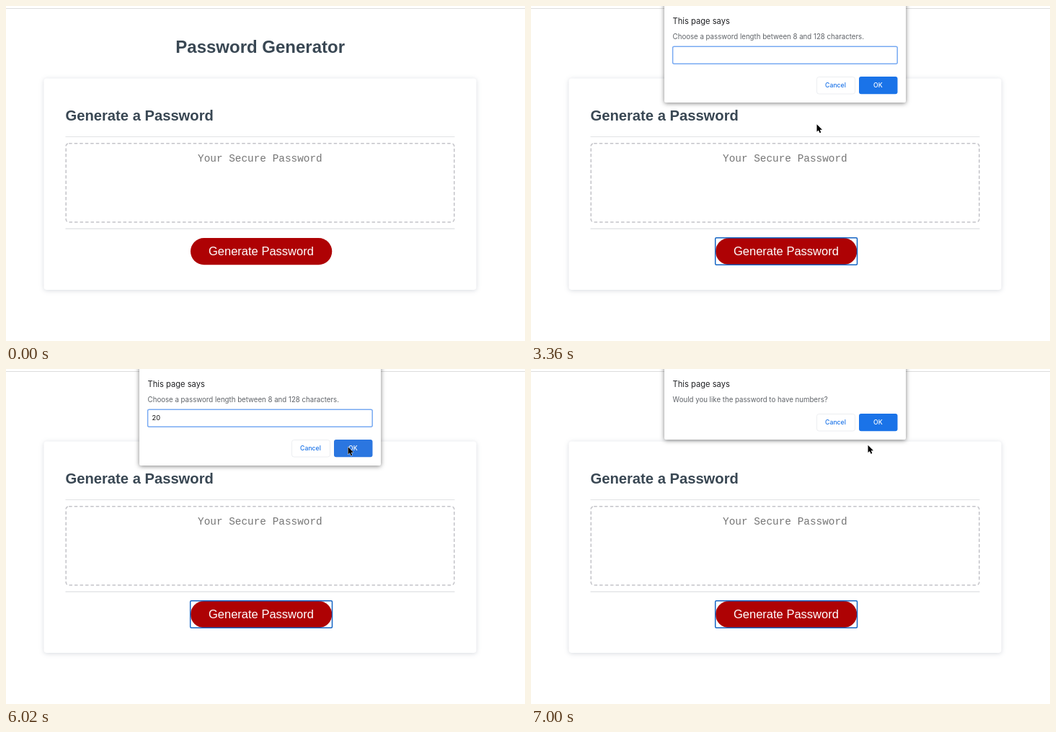
Animation, 720 px wide and 465 px high, one loop 8000 ms. Source, as an HTML page:

```html
<!DOCTYPE html>
<html lang="en">
<head>
<meta charset="utf-8">
<title>Password Generator</title>
<style>
  html, body { margin: 0; width: 100%; height: 100%; overflow: hidden; background: #fff; }
  svg { display: block; width: 720px; height: 465px; }
  text { white-space: pre; }
  .heading { font-family: "Liberation Sans", Arial, sans-serif; font-weight: 700; fill: #394753; }
  .label { font: 16.5px "Liberation Sans", Arial, sans-serif; fill: #fff; }
  .hint { font: 14.4px "Liberation Mono", "Courier New", monospace; fill: #757575; }
  .card { fill: #fff; filter: drop-shadow(0 1.5px 3px rgba(40, 60, 90, .19)); }
  .panel { fill: #fff; filter: drop-shadow(0 1px 3px rgba(0, 0, 0, .5)); }
  .dialog text { font-family: Inter, Roboto, sans-serif; }
  .dialog .title { font-size: 11.15px; fill: #202124; }
  .dialog .message { font-size: 9.68px; fill: #5f6368; }
  .dialog .entry { font-size: 9.3px; fill: #111; }
  .button { font: 500 8.7px Inter, Roboto, sans-serif; text-anchor: middle; }
  .ok { fill: var(--ok, #1a73e8); }
  .cursor { stroke: #fff; stroke-width: 1; stroke-linejoin: round; paint-order: stroke; }
</style>
</head>
<body>
<svg viewBox="0 0 720 465">
  <defs>
    <g id="buttons">
      <rect x="396.5" y="98.5" width="53" height="23.5" rx="3" fill="#fff" stroke="#eceef1"/>
      <text class="button" x="422.5" y="113.2" fill="#1a73e8">Cancel</text>
      <rect class="ok" x="455" y="98" width="53.5" height="24.3" rx="3"/>
      <text class="button" x="481.3" y="113.2" fill="#fff">OK</text>
    </g>
  </defs>

  <rect y="3" width="720" height="1" fill="#dcdcdc"/>
  <text class="heading" x="235.3" y="64.5" font-size="24">Password Generator</text>

  <rect class="card" x="52.5" y="100.5" width="600" height="293.5" rx="4"/>
  <text class="heading" x="82.5" y="159" font-size="20.2">Generate a Password</text>
  <rect x="82.5" y="181" width="540" height="1" fill="#e1e3e5"/>
  <rect x="83.2" y="190.7" width="538.6" height="109.4" rx="4" fill="none"
        stroke="#c4c4c9" stroke-width="1.5" stroke-dasharray="4.5 3"/>
  <text class="hint" x="266" y="215.5">Your Secure Password</text>
  <rect x="82.5" y="308.5" width="540" height="1.3" fill="#dfe1e4"/>

  <rect x="256" y="322" width="196.3" height="37.2" rx="18.6" fill="#ae0204"/>
  <text class="label" x="281" y="346">Generate Password</text>
  <rect id="ring" x="255.7" y="321.7" width="196.8" height="37.6" rx="1.5"
        fill="none" stroke="#1565c4" stroke-width="1.5"/>

  <g id="prompt" class="dialog">
    <rect class="panel" x="185" y="-8" width="335" height="142" rx="2"/>
    <text class="title" x="196.6" y="24.7">This page says</text>
    <text class="message" x="196.6" y="46.4">Choose a password length between 8 and 128 characters.</text>
    <rect x="196.6" y="56.3" width="311.6" height="24" rx="2" fill="#fff" stroke="#78aaf2" stroke-width="1.5"/>
    <text id="entry" class="entry" x="202.6" y="71.3"></text>
    <rect id="caret" y="62.3" width="1" height="11.5" fill="#222"/>
    <use href="#buttons"/>
  </g>

  <g id="confirm" class="dialog">
    <rect class="panel" x="185" y="-8" width="335" height="106" rx="2"/>
    <text class="title" x="196.6" y="24.7">This page says</text>
    <text class="message" x="196.6" y="46.4">Would you like the password to have numbers?</text>
    <use href="#buttons" y="-36"/>
  </g>

  <g id="pointer">
    <path id="arrow" class="cursor" d="M.5 .3V10.6L2.9 8.4 4.6 12.3 6.3 11.6 4.7 7.8H8Z"/>
    <g id="hand" fill="#fff" stroke="#111" stroke-width=".9" stroke-linejoin="round">
      <path d="M1.6 8.2 .3 1.7C.1 .3 1.8 0 2.2 1.4L3.2 5C3.6 4 4.8 4.1 5 5.1 5.4 4.3 6.5 4.5 6.7 5.4 7.3 4.8 8.2 5.2 8.3 6.2L8.6 9.4 7.6 13.2H2L-1.2 8.7C-1.8 7.5-.6 6.8 .3 7.6Z"/>
      <path d="M3.4 8.8 3.7 11.3M5 8.7 5.2 11.2M6.6 8.6V11.1" fill="none" stroke-width=".7"/>
    </g>
    <path id="beam" d="M-2.3 -5.7Q0 -5.7 0 -4.2V4.2Q0 5.7-2.3 5.7M2.3 -5.7Q0 -5.7 0 -4.2V4.2Q0 5.7 2.3 5.7M-1.2 1.5H1.2"
          fill="none" stroke="#111" stroke-width="1"/>
  </g>
</svg>
<script>
  const LOOP = 8000, TICK = 70;
  const el = id => document.getElementById(id);
  const [ring, prompt, entry, caret, confirm, pointer] =
    ['ring', 'prompt', 'entry', 'caret', 'confirm', 'pointer'].map(el);

  // [time, x, y]
  const path = [
    [0, 440, 480], [70, 440, 480], [140, 434, 455], [350, 398, 396], [560, 366, 352], [770, 357, 341],
    [2940, 357, 341], [3150, 371, 280], [3360, 396, 164], [3570, 368, 102], [3780, 315, 71],
    [4060, 310.5, 67], [5040, 310.5, 67], [5320, 345, 74], [5530, 420, 93], [5810, 477, 109],
    [6510, 467, 105.5], [LOOP, 467, 105.5]
  ];
  // [start time, value]
  const shape = [[0, 'arrow'], [1540, 'hand'], [2450, 'arrow'], [3850, 'beam'], [5460, 'arrow']];
  const typed = [[0, ''], [4690, '2'], [5110, '20']];
  const caretOn = [[0, 1], [3220, 0], [3780, 1], [4270, 0], [4690, 1], [5600, 0], [6090, 1], [6650, 0]];
  const okColor = [[0, '#1a73e8'], [5740, '#2b76e0'], [6650, '#4380d8']];
  const promptFade = [[0, 0], [2590, .45], [2660, .85], [2730, 1], [6790, .4], [6860, 0]];
  const confirmFade = [[0, 0], [6930, .6], [7000, 1]];

  const at = (steps, t) => steps.findLast(([start]) => start <= t)[1];

  function position(t) {
    const i = path.findIndex(([time]) => time > t);
    const [t0, x0, y0] = path[i - 1], [t1, x1, y1] = path[i];
    const k = (t - t0) / (t1 - t0);
    return [x0 + (x1 - x0) * k, y0 + (y1 - y0) * k];
  }

  function draw(now) {
    const t = Math.floor((now % LOOP) / TICK + 1e-6) * TICK;
    ring.style.opacity = t >= 1470 ? 1 : 0;
    prompt.style.opacity = at(promptFade, t);
    prompt.style.setProperty('--ok', at(okColor, t));
    confirm.style.opacity = at(confirmFade, t);

    const value = at(typed, t);
    entry.textContent = value;
    caret.setAttribute('x', 202 + (value ? entry.getComputedTextLength() : 0));
    caret.style.opacity = at(caretOn, t);

    const kind = at(shape, t);
    for (const cursor of pointer.children) {
      cursor.style.display = cursor.id === kind ? '' : 'none';
    }
    pointer.setAttribute('transform', `translate(${position(t)})`);
  }

  const begin = performance.now();
  function frame() {
    draw(performance.now() - begin);
    requestAnimationFrame(frame);
  }
  frame();
</script>
</body>
</html>
```
